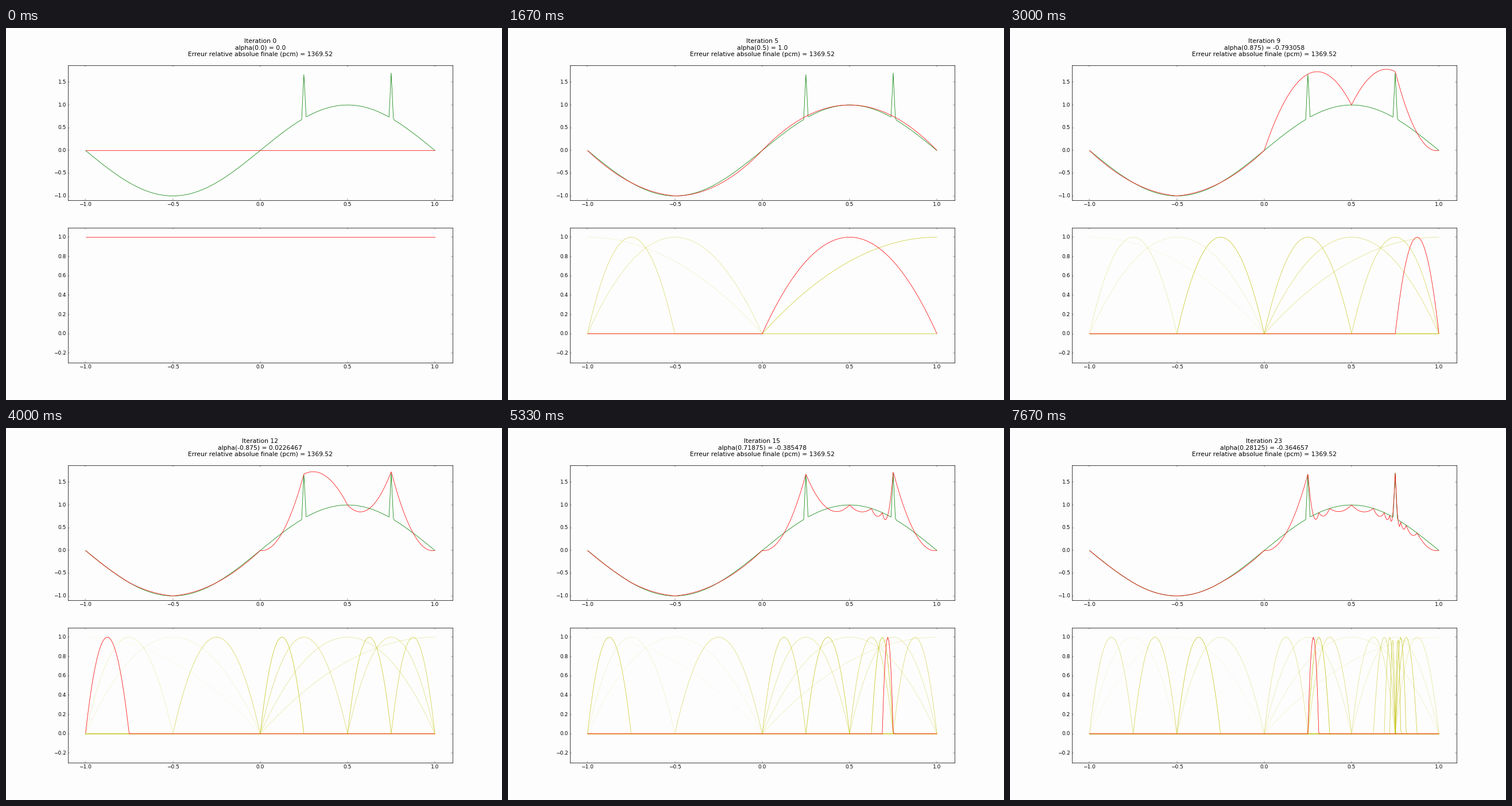
Recreate the animation shown at these times as a matplotlib script. Size 864 by 648 pixels, loop 8 s.

```python
import numpy as np
import matplotlib.pyplot as plt
from matplotlib.animation import FuncAnimation

plt.style.use("classic")
plt.rcParams["font.family"] = "DejaVu Sans"

STEPS = 24
LOOP_MS = 8000
PAPER = "#fdfdfd"
WIDTH = 0.0125  # half-width of the two spikes
X = np.linspace(-1, 1, 321) * 0.9995


def signal(x):
    """Sine wave with a steep tent standing on it at 0.25 and 0.75."""
    for peak in (0.25, 0.75):
        if abs(x - peak) < WIDTH:
            foot = peak - WIDTH if x <= peak else peak + WIDTH
            return np.sin(np.pi * foot) + abs(x - foot) / WIDTH
    return np.sin(np.pi * x)


def hat(node, x):
    """Quadratic hierarchical basis function of a (position, half-width) node."""
    centre, half = node
    if half is None:
        return np.ones_like(x)
    return np.maximum(0, 1 - ((x - centre) / half) ** 2)


def children(node):
    centre, half = node
    if half is None:
        return [(-1.0, 1.0), (1.0, 1.0)]
    if half == 1:
        return [(centre / 2, 0.5)]
    return [(centre - half / 2, half / 2), (centre + half / 2, half / 2)]


def refine(steps):
    """Greedy refinement by surplus; every fourth step takes the oldest node."""
    chosen, pending = [], [(0.0, None)]

    def surplus(node):
        x = np.float64(node[0])
        return signal(x) - sum(a * hat(n, x) for n, a in chosen)

    for step in range(steps):
        if step % 4 == 0:
            node = pending[0]
        else:
            node = max(pending, key=lambda n: round(abs(surplus(n)), 9))
        pending.remove(node)
        chosen.append((node, surplus(node)))
        pending += children(node)
    return chosen


nodes = refine(STEPS)
bases = np.array([hat(node, X) for node, _ in nodes])
weights = np.array([alpha for _, alpha in nodes])
reference = np.array([signal(x) for x in X])

fig, (top, bottom) = plt.subplots(2, 1, figsize=(16, 12), dpi=54)
fig.set_facecolor(PAPER)
for ax, limits in ((top, (-1.1, 1.1 * reference.max())), (bottom, (-0.3, 1.1))):
    ax.set_facecolor(PAPER)
    ax.set_xlim(-1.1, 1.1)
    ax.set_ylim(*limits)
top.set_yticks(np.arange(-1, 1.6, 0.5))
bottom.set_yticks(np.arange(-0.2, 1.1, 0.2))

top.plot(X, reference, "g")
approximation, = top.plot(X, 0 * X, "r")
older = [bottom.plot(X, basis, "y")[0] for basis in bases]
current, = bottom.plot(X, bases[0], "r")
title = top.set_title("", pad=5)


def draw(step):
    centre, alpha = nodes[step][0][0], float(f"{weights[step]:.6g}")
    title.set_text(f"Iteration {step}\nalpha({centre}) = {alpha}\n"
                   "Erreur relative absolue finale (pcm) = 1369.52\n")
    approximation.set_ydata(weights[:step + 1] @ bases[:step + 1])
    current.set_ydata(bases[step])
    for i, line in enumerate(older):
        line.set_visible(i < step)
        line.set_alpha(i / max(step, 1) if i < step else 0)
    return [title, approximation, current, *older]


anim = FuncAnimation(fig, draw, frames=STEPS, interval=LOOP_MS / STEPS,
                     repeat=True, repeat_delay=0, blit=False)
plt.show()
```
